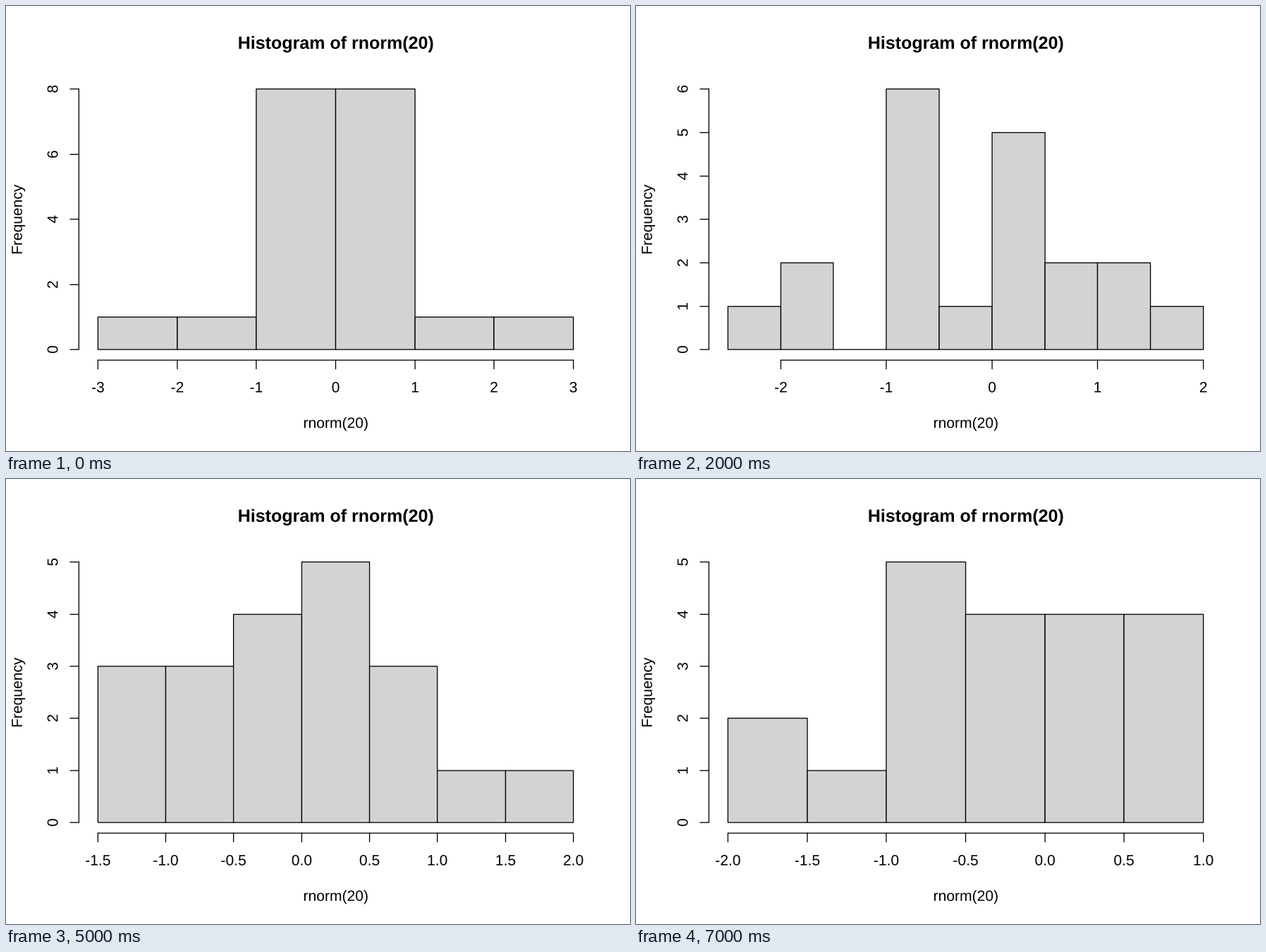
Recreate the animation shown at these times as a matplotlib script. Size 885 by 632 pixels, loop 8 s.

```python
import math

import matplotlib.pyplot as plt
import numpy as np
from matplotlib.animation import FuncAnimation
from matplotlib.patches import PathPatch, Rectangle
from matplotlib.text import Text
from matplotlib.textpath import TextPath, text_to_path
from matplotlib.transforms import Affine2D

plt.rcParams.update({"font.family": "Liberation Sans",
                     "text.kerning_factor": 6, "toolbar": "None"})

# The plot is laid out as a 7 x 5 inch page at 192 dpi, shown at 885 x 632.
W, H, DPI = 885, 632, 100
PAGE_W, PAGE_H = 7 * 192, 5 * 192
FONT = 32
ROW = 1.2 * FONT                      # one margin line
PEN = 2 * W / PAGE_W * 72 / DPI
GREY = "#d3d3d3"

# Plot region inside margins of 5.1, 4.1, 4.1 and 2.1 lines
LEFT, RIGHT = 4.1 * ROW, PAGE_W - 2.1 * ROW
TOP, BOTTOM = 4.1 * ROW, PAGE_H - 5.1 * ROW
MID_X, MID_Y = (LEFT + RIGHT) / 2, (TOP + BOTTOM) / 2

# Range and bar counts of each sample of twenty
SAMPLES = [
    (-3, 3, [1, 1, 8, 8, 1, 1]),
    (-1.5, 2, [1, 4, 4, 4, 2, 4, 1]),
    (-2.5, 2, [1, 2, 0, 6, 1, 5, 2, 2, 1]),
    (-3, 3, [2, 4, 4, 5, 4, 1]),
    (-2, 2, [1, 2, 3, 6, 3, 2, 2, 1]),
    (-1.5, 2, [3, 3, 4, 5, 3, 1, 1]),
    (-2, 1.5, [1, 3, 3, 5, 4, 3, 1]),
    (-2, 1, [2, 1, 5, 4, 4, 4]),
]

fig = plt.figure(figsize=(W / DPI, H / DPI), dpi=DPI, facecolor="white")
ax = fig.add_axes([0, 0, 1, 1])


def nice_ticks(lo, hi):
    """Round tick values inside lo..hi, about five steps apart."""
    cell = (hi - lo) / 5
    base = unit = 10 ** math.floor(math.log10(cell))
    for factor, bias in ((2, 0.8), (5, 1.7), (10, 0.8)):
        if factor * base - cell >= bias * (cell - unit):
            break
        unit = factor * base
    first, last = math.ceil(lo / unit), math.floor(hi / unit)
    return np.arange(first, last + 1) * unit, unit


def scale(lo, hi, start, end):
    """Map lo..hi to whole page units, with 4 % padding at both ends."""
    pad = 0.04 / 1.08 * (end - start)
    start, end = start + pad, end - pad
    return lambda v: int(start + (v - lo) / (hi - lo) * (end - start))


def write(x, y, text, size=FONT, weight="normal", angle=0):
    font = Text(fontsize=size, fontweight=weight).get_fontproperties()
    width = text_to_path.get_text_width_height_descent(text, font, False)[0]
    place = Affine2D().rotate_deg(angle).scale(1, -1).translate(x, y)
    path = TextPath((-width / 2, 0), text, prop=font).transformed(place)
    ax.add_patch(PathPatch(path, facecolor="black", lw=0, snap=False))


def line(x0, y0, x1, y1):
    ax.plot([int(x0), int(x1)], [int(y0), int(y1)], color="black", lw=PEN,
            solid_capstyle="round", snap=False)


def draw_bars(edges, counts, to_x, to_y):
    for a, b, n in zip(edges, edges[1:], counts):
        x, y = to_x(a), to_y(n)
        ax.add_patch(Rectangle((x, y), to_x(b) - x, to_y(0) - y,
                               facecolor=GREY, edgecolor="black", lw=PEN,
                               joinstyle="round", snap=False))


def draw_x_axis(lo, hi, to_x):
    ticks, unit = nice_ticks(lo, hi)
    line(to_x(ticks[0]), BOTTOM, to_x(ticks[-1]), BOTTOM)
    for v in ticks:
        line(to_x(v), BOTTOM, to_x(v), BOTTOM + ROW / 2)
        write(to_x(v), BOTTOM + 1.8 * ROW, f"{v:.{int(unit < 1)}f}")


def draw_y_axis(peak, to_y):
    ticks, _ = nice_ticks(0, peak)
    line(LEFT, to_y(ticks[0]), LEFT, to_y(ticks[-1]))
    for v in ticks:
        line(LEFT, to_y(v), LEFT - ROW / 2, to_y(v))
        write(LEFT - 1.2 * ROW, to_y(v), f"{v:.0f}", angle=90)


def draw(frame):
    ax.clear()
    ax.set(xlim=(0, PAGE_W), ylim=(PAGE_H, 0))
    ax.axis("off")

    lo, hi, counts = SAMPLES[frame]
    to_x = scale(lo, hi, LEFT, RIGHT)
    to_y = scale(0, max(counts), BOTTOM, TOP)

    draw_bars(np.linspace(lo, hi, len(counts) + 1), counts, to_x, to_y)
    draw_x_axis(lo, hi, to_x)
    draw_y_axis(max(counts), to_y)
    write(MID_X, 92.3, "Histogram of rnorm(20)", int(1.2 * FONT), "bold")
    write(MID_X, BOTTOM + 3.8 * ROW, "rnorm(20)")
    write(LEFT - 3.2 * ROW, MID_Y, "Frequency", angle=90)
    return []


anim = FuncAnimation(fig, draw, frames=len(SAMPLES), interval=1000,
                     repeat=True, repeat_delay=0)
plt.show()
```
